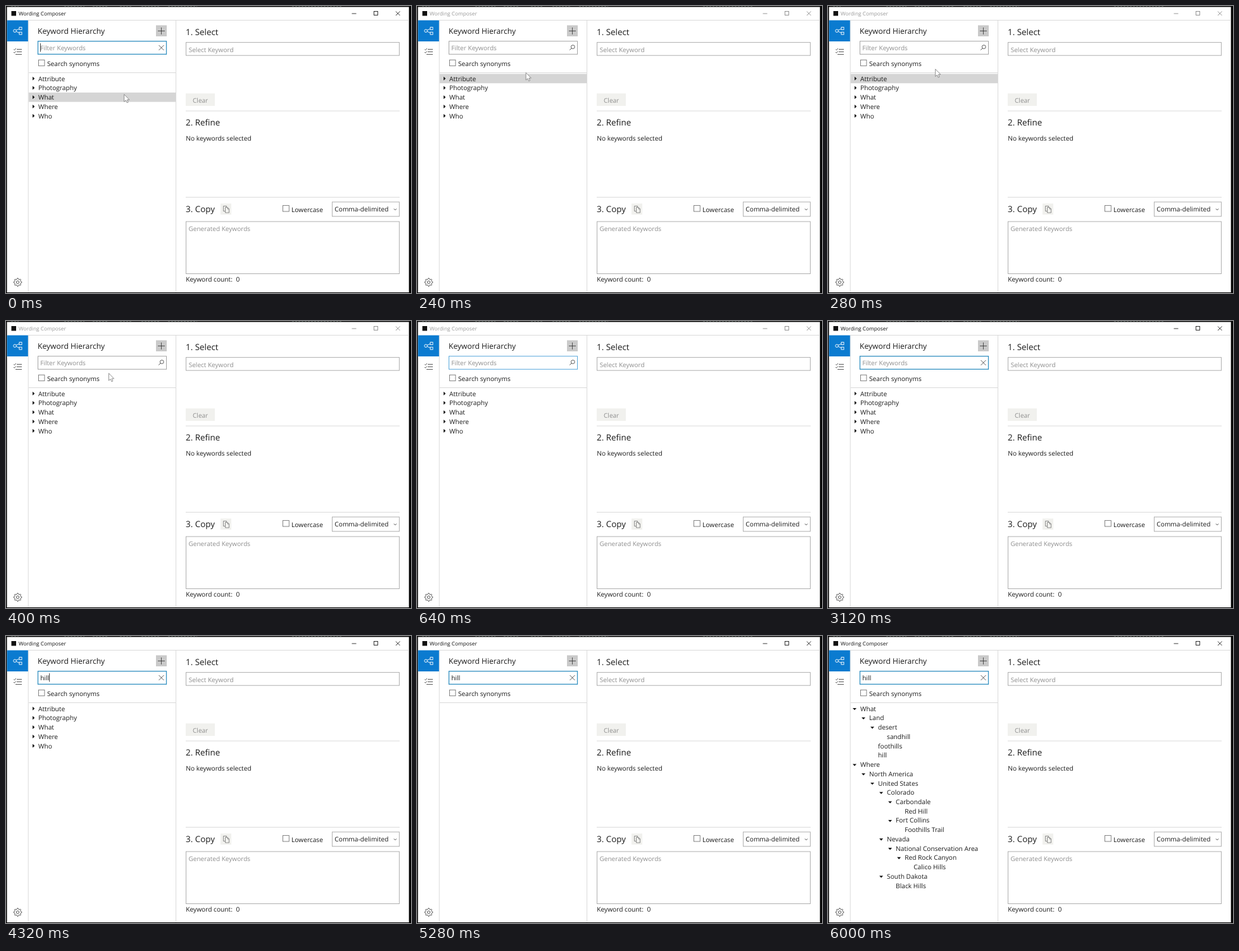
An HTML page that plays this animation: 640 px wide and 454 px high, repeating every 6280 ms.

```html
<!DOCTYPE html>
<html lang="en">
<head>
<meta charset="utf-8">
<title>Keyword picker</title>
<style>
  html, body { margin: 0; width: 100%; height: 100%; overflow: hidden; background: #fff; }
  svg { display: block; width: 640px; height: 454px; }
  text { font: 10.2px "Open Sans", "Noto Sans", sans-serif; fill: #1a1a1a; text-rendering: geometricPrecision; white-space: pre; }
  .heading { font-size: 13.4px; }
  .hint { font-size: 10.05px; fill: #8e8e8e; }
  .line { fill: none; stroke: #dadada; }
  .box { fill: #fff; stroke: #b0b0b0; }
  .check { fill: #fff; stroke: #777; stroke-width: .9; }
  .icon { fill: none; stroke: #333; stroke-width: .8; }
</style>
</head>
<body>
<svg viewBox="0 0 640 454">
  <rect width="640" height="454" fill="#050505"/>
  <path d="M8 .5h12M92 .5h32M137 .5h24M180 .5h18M214 .5h28M256 .5h46M452 .5h78" stroke="#3c4440" stroke-dasharray="3 2"/>
  <rect x="1.5" y="1.5" width="635.2" height="451.5" fill="#fff"/>
  <path class="line" d="M35 22.5H636.5M35.2 23V453M268.6 23V453M36 105.5H268M284 166H622M284 302.5H622"/>

  <rect x="8.5" y="8" width="7.5" height="7.5" fill="#111"/>
  <text id="title" x="20" y="15.2" style="font-size:8.3px">Wording Composer</text>
  <g id="controls" fill="none" stroke-width=".9">
    <path d="M546.5 12H553.5M616 8.5L622.5 15M622.5 8.5L616 15"/>
    <rect x="581.5" y="8.5" width="6" height="6"/>
  </g>

  <rect x="1.6" y="22.6" width="33.2" height="33.4" fill="#0b7bd0"/>
  <g fill="none" stroke="#fff" stroke-width=".9">
    <circle cx="14" cy="39.3" r="2.3"/>
    <path d="M16 38.3L21 36.1M16 40.3L21 42.5"/>
    <rect x="21" y="33.6" width="4" height="3.8"/>
    <rect x="21" y="41.3" width="4" height="3.8"/>
  </g>
  <path class="icon" d="M12 68.5l1.3 1.3 2.5-2.8M12 73l1.3 1.3 2.5-2.8M17 68.5H25M17 72.5H25M15 76.5H25"/>
  <path id="gear" class="icon"/>
  <circle class="icon" cx="18.5" cy="437" r="2.2"/>

  <text x="50" y="44.2" style="font-size:12.1px">Keyword Hierarchy</text>
  <rect x="237" y="30.5" width="17" height="17.5" fill="#c9c9c9"/>
  <path class="icon" d="M240 39.5H251M245.5 34V45"/>
  <rect id="filter" x="50.5" y="55.7" width="203" height="20.6" fill="#fff"/>
  <text id="filterHint" class="hint" x="54.3" y="70">Filter Keywords</text>
  <text id="typed" x="54.3" y="70"></text>
  <path id="caret" stroke="#111" stroke-width=".8"/>
  <path id="clearIcon" class="icon" d="M241.5 62L249.5 70M249.5 62L241.5 70"/>
  <g id="searchIcon" class="icon"><circle cx="246.3" cy="64.7" r="2.9"/><path d="M244.2 66.8L241.2 69.8"/></g>
  <rect class="check" x="51.5" y="85.3" width="9.4" height="9.4"/>
  <text x="65" y="95">Search synonyms</text>

  <rect id="hover" x="35.8" width="232.4" height="14.8" fill="#d5d5d5"/>
  <g id="roots"></g>
  <g id="results"></g>

  <text class="heading" x="284" y="45.6">1. Select</text>
  <rect class="box" x="284.5" y="57.6" width="337" height="20.6"/>
  <text class="hint" x="288.7" y="72.6">Select Keyword</text>
  <rect x="284" y="138.3" width="46" height="19.7" fill="#f1f1ee"/>
  <text class="hint" x="295" y="152.6">Clear</text>

  <text class="heading" x="284" y="189.2">2. Refine</text>
  <text x="284.3" y="212.6">No keywords selected</text>

  <text class="heading" x="284" y="325.6">3. Copy</text>
  <rect x="339" y="312.5" width="17" height="17.5" fill="#f1f1ee"/>
  <path class="icon" style="stroke:#777" d="M346 324.5H343.5V316.5H348.5V318.5M346.5 318.5H350L352.5 321V327H346.5ZM350 318.5V321H352.5"/>
  <rect class="check" x="437.5" y="315.6" width="9.8" height="9.4"/>
  <text x="451" y="325.6">Lowercase</text>
  <rect class="box" x="515.5" y="310" width="106" height="22.8"/>
  <text x="519.3" y="324.5">Comma-delimited</text>
  <path class="icon" d="M612.8 320.7L615 322.7L617.2 320.7"/>
  <rect class="box" x="284.5" y="341" width="337" height="82.5"/>
  <text class="hint" x="288.5" y="355.6">Generated Keywords</text>
  <text x="284.3" y="436.1">Keyword count:</text>
  <text x="363.4" y="436.1">0</text>

  <path id="cursor" d="M0 0V11.6L2.7 9.2L4.5 13.2L6.4 12.4L4.7 8.5H8.2Z" fill="#fff" stroke="#777" stroke-width=".8"/>
</svg>
<script>
const LOOP = 6280, ROW_TOP = 107.4, ROW_HEIGHT = 14.74, INDENT = 14.03;
const el = id => document.getElementById(id);
const show = (id, on) => el(id).setAttribute('display', on ? 'inline' : 'none');

// Leading dots give the depth; "+" marks a branch.
const ROOTS = '+Attribute|+Photography|+What|+Where|+Who';
const RESULTS = '+What|.+Land|..+desert|...sandhill|..foothills|..hill|+Where|.+North America|' +
  '..+United States|...+Colorado|....+Carbondale|.....Red Hill|....+Fort Collins|.....Foothills Trail|' +
  '...+Nevada|....+National Conservation Area|.....+Red Rock Canyon|......Calico Hills|' +
  '...+South Dakota|....Black Hills';

function treeMarkup(list, open) {
  return list.split('|').map((item, row) => {
    const [, dots, branch, label] = item.match(/^(\.*)(\+?)(.*)$/);
    const x = 51 + dots.length * INDENT, y = 115 + row * ROW_HEIGHT;
    const arrow = open ? `M${x - 12} ${y - 1}h6l-3 3.3z` : `M${x - 9} ${y - 3.2}v6l3.3 -3z`;
    return (branch && `<path d="${arrow}" fill="#111"/>`) + `<text x="${x}" y="${y + 3.6}">${label}</text>`;
  }).join('');
}

function gearPath() {
  const points = [];
  for (let i = 0; i < 32; i++) {
    const angle = (i - .5) * Math.PI / 16, r = i % 4 < 2 ? 6.4 : 4.8;
    points.push(`${18.5 + r * Math.cos(angle)} ${437 + r * Math.sin(angle)}`);
  }
  return `M${points.join('L')}Z`;
}

el('roots').innerHTML = treeMarkup(ROOTS, false);
el('results').innerHTML = treeMarkup(RESULTS, true);
el('gear').setAttribute('d', gearPath());

const KEY_TIMES = [3680, 3800, 4040, 4320];
const CARET_SPANS = [[0, 40], [1560, 2200], [2600, 3120], [3680, 4800], [5360, 5880]];
const pointerY = t => 139.8 - Math.max(t, 0) / 7;

function render(time) {
  const t = Math.floor(time / 40) * 40;
  const active = t < 40 || t >= 1560;
  const inField = t >= 440;

  el('title').style.fill = active ? '#111' : '#999';
  el('controls').setAttribute('stroke', active ? '#222' : '#8c8c8c');
  el('filter').setAttribute('stroke', active ? '#3792c2' : inField ? '#5aa9dc' : '#a6a6a6');
  el('filter').setAttribute('stroke-width', active ? 1.3 : 1);
  show('clearIcon', active);
  show('searchIcon', !active);

  const word = 'hill'.slice(0, KEY_TIMES.filter(k => t >= k).length);
  el('typed').textContent = word;
  show('filterHint', !word);
  const caretX = 54.4 + (word ? el('typed').getComputedTextLength() + .3 : 0);
  el('caret').setAttribute('d', `M${caretX} 59V72.5`);
  show('caret', CARET_SPANS.some(([from, to]) => t >= from && t < to));

  // Row highlighting trails the pointer slightly.
  const row = Math.floor((pointerY(t - 60) - ROW_TOP) / ROW_HEIGHT);
  el('hover').setAttribute('y', ROW_TOP + Math.max(row, 0) * ROW_HEIGHT);
  show('hover', row >= 0);
  el('cursor').setAttribute('transform', `translate(${186.7 - t * 17 / 280} ${pointerY(t)})`);
  show('cursor', !inField);

  show('roots', t < 5280);
  show('results', t >= 5360);
}

const start = performance.now();
function tick() {
  render((performance.now() - start) % LOOP);
  requestAnimationFrame(tick);
}
tick();
</script>
</body>
</html>
```
